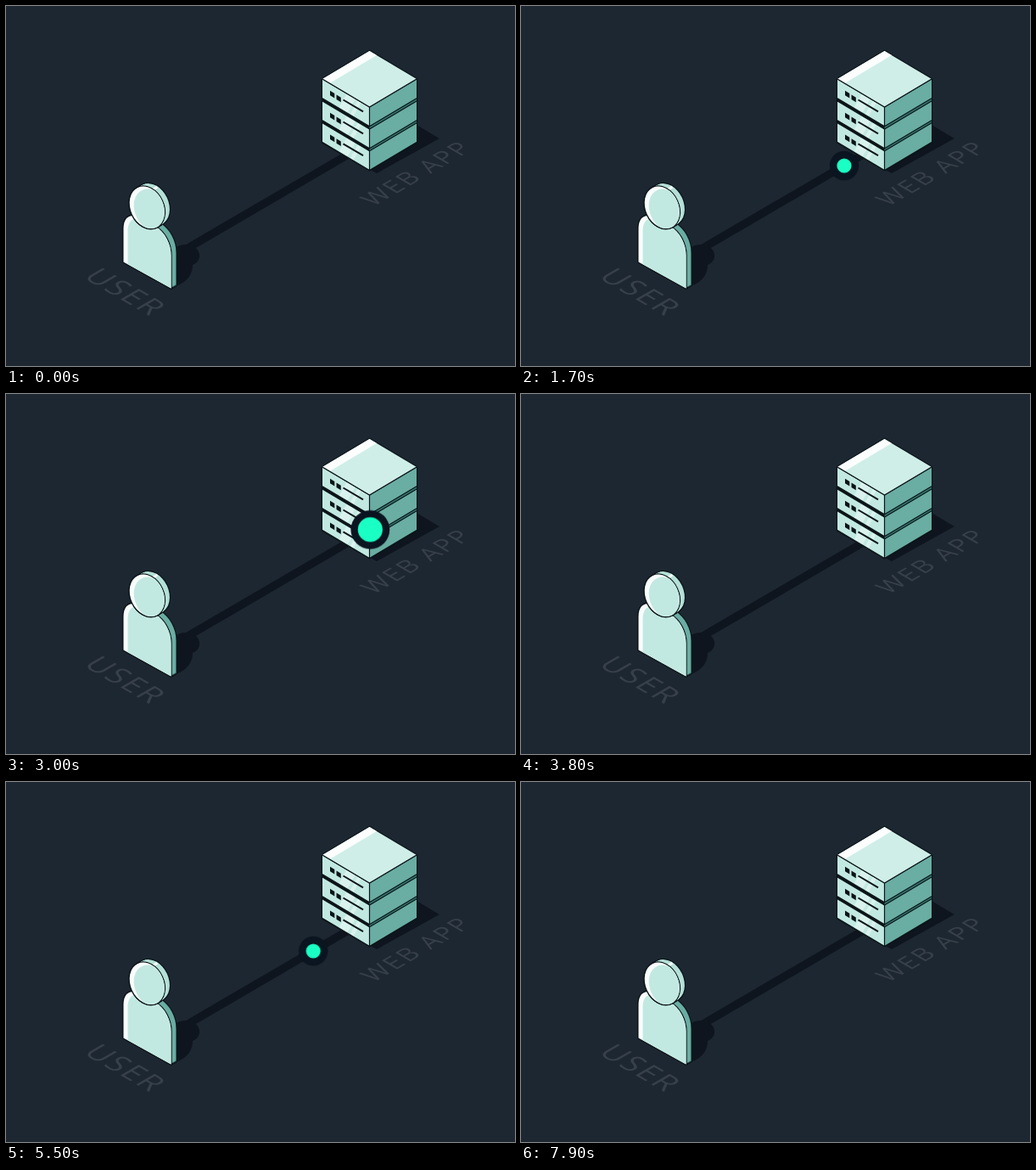
Recreate the animation shown at these times as an HTML page. Size 600 by 424 pixels, loop 8 s.

```html
<!DOCTYPE html>
<html lang="en">
<head>
<meta charset="utf-8">
<title>Request and response</title>
<style>
html, body { margin: 0; width: 100%; height: 100%; overflow: hidden; background: #1d2731; }
svg { display: block; width: 100%; height: 100%; }
text { font-family: "Open Sans", "Noto Sans", sans-serif; fill: #37404a; }
.ink { fill: #0a1418; stroke: #0a1418; stroke-width: 2.4; stroke-linejoin: round; }
.edge { fill: none; stroke: #0a1418; stroke-width: 1.2; stroke-linejoin: round; }
.shadow { fill: #0e151e; }
.front { fill: #c2e9e1; }
.side { fill: #6aada2; }
.ring { fill: #0b1521; }
.dot { fill: #1affc4; }

.packet, .pulse { animation: 8s infinite cubic-bezier(.37, 0, .63, 1); }
.packet { animation-name: travel; }
.pulse { animation-name: beat; }

/* Out to the server, wait behind it, and back behind the user. */
@keyframes travel {
  0%, 10% { transform: translate(170px, 311.5px); }
  25.75%, 63.4% { transform: translate(429px, 160px); }
  79.15%, 100% { transform: translate(170px, 311.5px); }
}
@keyframes beat {
  0%, 26.625%, 33.625%, 40.625%, 47.625%, 54.625%, 61.625%, 100% {
    transform: translate(429.3px, 159.7px) scale(0);
  }
  30.125%, 37.125%, 44.125%, 51.125%, 58.125% {
    transform: translate(429.3px, 159.7px) scale(1);
  }
}
</style>
</head>
<body>
<svg viewBox="0 0 600 424" preserveAspectRatio="none">
  <defs>
    <path id="body" d="M138.500 301.500V262C138.500 249 146 244 157 248.500L176 259.500C187 266 194.500 280 194.500 294V332.500Z"/>
    <ellipse id="head" rx="19.300" ry="25.800" transform="translate(166.300 237.300) rotate(-25)"/>
    <clipPath id="bodyClip"><use href="#body"/></clipPath>
    <clipPath id="headClip"><use href="#head"/></clipPath>
    <clipPath id="besideUser"><rect x="198" width="402" height="424"/></clipPath>
    <clipPath id="panelClip"><path d="M373 86L428.500 119V141.800L373 108.800Z"/></clipPath>
    <linearGradient id="sideFill" gradientUnits="userSpaceOnUse" x1="150" x2="186">
      <stop stop-color="#b4e0d7"/><stop offset="1" stop-color="#6aada2"/>
    </linearGradient>
  </defs>

  <rect width="600" height="424" fill="#1d2731"/>

  <text transform="matrix(.866 .5 -.866 .5 89.800 319.500)" font-size="35" letter-spacing="2" style="font-kerning:none" fill-opacity="1"><tspan>USER</tspan></text>
  <text transform="matrix(.866 -.5 .866 .5 433.500 236.300)" font-size="29" letter-spacing="2">WEB APP</text>

  <path d="M404 174.500L200 293.500" stroke="#0e151e" stroke-width="9.500"/>
  <path class="shadow" d="M484 140L511 156L437 197L426 191Z"/>
  <path class="shadow" d="M198 286C205 280 218 279 225 286C231 293 228 302 220 305C220 316 214 325 200 330Z"/>

  <g clip-path="url(#besideUser)">
    <g class="packet"><circle class="ring" r="17.200"/><circle class="dot" r="8.600"/></g>
  </g>

  <g id="user"></g>

  <g id="server">
    <path class="ink" d="M428.500 53L484 86V160.600L428.500 193L373 160.600V86Z"/>
    <path d="M428.500 119L484 86V160L428.500 192Z" fill="#34756e"/>
    <g id="slabs"></g>
    <path d="M428.500 53L484 86L428.500 119L373 86Z" fill="#d0eee8"/>
    <path d="M428.500 53L437 58L381.500 91L373 86Z" fill="#fbfefd"/>
    <path class="edge" d="M373 86L428.500 119L484 86"/>
  </g>

  <g class="pulse"><circle class="ring" r="23.600"/><circle class="dot" r="15"/></g>
</svg>
<script>
const byId = id => document.getElementById(id);

// Thick cut-out: stacked copies form the side, an offset copy leaves a lit rim.
function cutout(shape, sideFill, extra = '') {
  const stack = attrs => [0, 1, 2, 3, 4, 5, 6]
    .map(i => `<use href="#${shape}" x="${i}" y="${-i * .57}" ${attrs}/>`).join('');
  return stack('class="ink"') + stack(`fill="${sideFill}"`) + extra +
    `<use href="#${shape}" class="ink"/>
     <use href="#${shape}" fill="#f8fdfc"/>
     <g clip-path="url(#${shape}Clip)"><use href="#${shape}" class="front" x="5" y="3"/></g>`;
}

const glint = '<path d="M172 217L178.500 213" stroke="#f4fbfa" stroke-width="3"/>';
byId('user').innerHTML = cutout('body', '#6aada2') + cutout('head', 'url(#sideFill)', glint);

const slab = y => `<g transform="translate(0 ${y})">
  <path class="side" d="M428.500 119L484 86V108.800L428.500 141.800Z"/>
  <path class="front" d="M373 86L428.500 119V141.800L373 108.800Z"/>
  <g clip-path="url(#panelClip)" fill="#daf2ed">
    <path d="M406 96L416 102L399 132L389 126Z"/>
    <path d="M419 104L423 106L405 138L401 136Z"/>
  </g>
  <path class="edge" d="M373 86L428.500 119L484 86M373 108.800L428.500 141.800L484 108.800M428.500 119V141.800"/>
  <path d="M382 99.800L387.300 103V108.500L382 105.300ZM389.500 104.500L394.800 107.700V113.200L389.500 110Z" fill="#0a1418"/>
  <path d="M397.500 110.500L421 124.300" stroke="#0a1418" stroke-width="2"/>
</g>`;
byId('slabs').innerHTML = [51.8, 26, 0].map(slab).join('');
</script>
</body>
</html>
```
